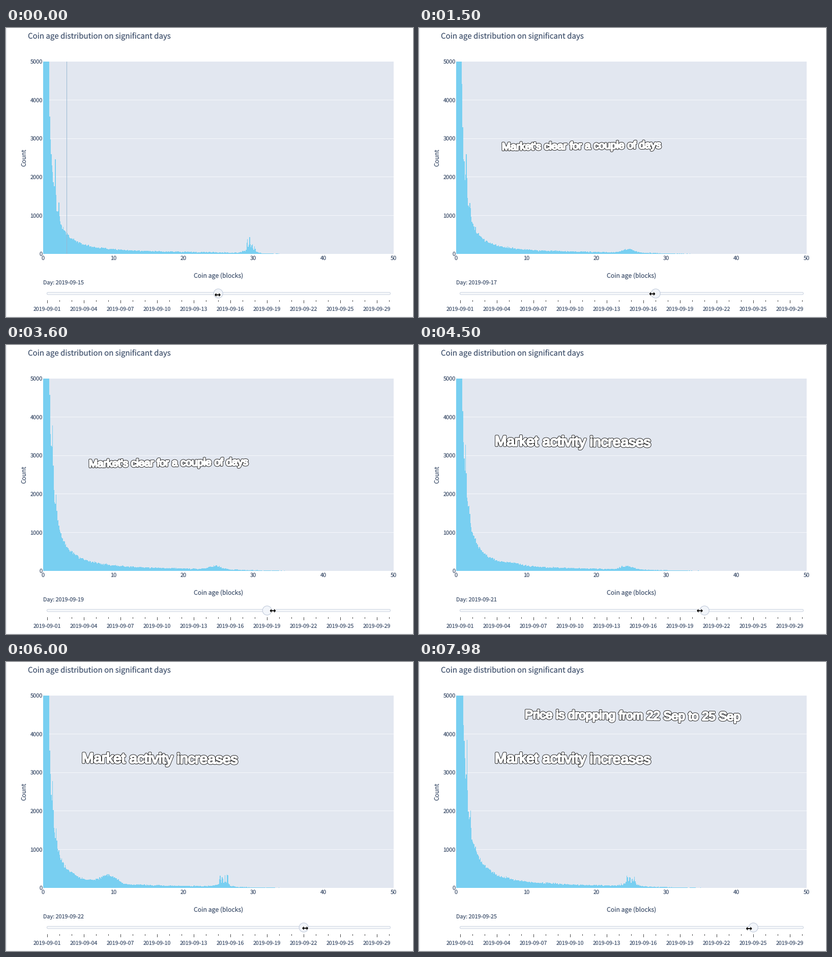
A matplotlib script for the animation above (8000 ms loop, 800 by 568 pixels).

```python
import numpy as np
import matplotlib.pyplot as plt
from matplotlib.animation import FuncAnimation
from matplotlib.collections import PolyCollection
from matplotlib.patches import Circle, FancyBboxPatch, Polygon, Rectangle
from matplotlib.patheffects import Normal, Stroke

W, H, DPI = 800, 568, 100
PT = 72 / DPI  # points per pixel
STEP, LOOP = 40, 8000

LEFT, RIGHT, TOP, BASE = 73, 762, 66, 444.3
UNIT = (RIGHT - LEFT) / 50
PER_COUNT = (BASE - TOP) / 5000
DAY_X0, DAY_DX, RAIL_Y = 81.2, 24, 521.8

INK, PLOT_BG, BAR = "#43546f", "#e2e7f0", "#78cff1"

plt.rcParams["font.family"] = ["Noto Sans CJK JP", "DejaVu Sans"]
plt.rcParams["text.hinting"] = "none"

# ---- histogram model ------------------------------------------------------
AGES = np.arange(500) * 0.1 + 0.05
FIRST_DAY, LAST_DAY = 15, 25
BURST_DAYS = {15, 18, 22, 25}


def bump(center, height, sigma):
    return height * np.exp(-((AGES - center) / sigma) ** 2 / 2)


def histogram(day):
    """Power-law decay, its echoes, a drifting hump and an old cohort."""
    rng = np.random.default_rng(day)
    scale = np.interp(day, [15, 17, 18, 21, 22, 23, 25],
                      [3150, 2850, 4100, 3500, 3000, 2050, 4500])
    n = scale * AGES ** -1.5 * np.minimum(AGES, 1) ** -1.2
    n = n / (1 + (AGES / 31) ** 8) + 25 / (1 + (AGES / 29) ** 12)

    echo = np.interp(day, [15, 18, 23, 25], [1.76, 1.34, 1.37, 1.55])
    n += bump(echo, 0.35 * scale, 0.06) + bump(echo + 0.5, 0.1 * scale, 0.06)

    hump = 280 * np.exp(-((day - 22.7) / 1.2) ** 2)
    n += bump(8.2 + 1.1 * (day - 21), hump, 1.1)

    old = np.interp(day, [15, 17, 21, 23, 25], [29.4, 24.6, 24.4, 26.7, 24.7])
    n += bump(old, 85, 0.8)
    if day in BURST_DAYS:
        for k in range(4):
            n += bump(old - 0.3 + 0.35 * k, rng.uniform(120, 330), 0.08)
    if day == 18:
        n += bump(3.19, 3900, 0.06) + bump(6.8, 130, 1.3)

    rough = 0.03 + 0.004 * AGES
    return np.clip(n * (1 + rough * rng.normal(size=AGES.size)), 0, 5000)


def bar_quads(counts):
    x0 = LEFT + (AGES - 0.05) * UNIT
    x1 = x0 + 0.1 * UNIT
    y = BASE - counts * PER_COUNT
    floor = np.full_like(y, BASE)
    xs = np.stack([x0, x0, x1, x1], axis=1)
    ys = np.stack([floor, y, y, floor], axis=1)
    return np.stack([xs, ys], axis=2)


QUADS = {day: bar_quads(histogram(day))
         for day in range(FIRST_DAY, LAST_DAY + 1)}

# ---- stage ----------------------------------------------------------------
fig = plt.figure(figsize=(W / DPI, H / DPI), dpi=DPI, facecolor="white")
ax = fig.add_axes([0, 0, 1, 1])
ax.set_xlim(0, W)
ax.set_ylim(H, 0)
ax.axis("off")


def rect(x, y, w, h, color, z=1):
    return ax.add_patch(Rectangle((x, y), w, h, fc=color, lw=0, zorder=z))


def label(x, y, s, size, ha="center", **kw):
    return ax.text(x, y, s, fontsize=size * PT, color=INK, ha=ha,
                   va="baseline", **kw)


rect(0, 0, 1.5, H, "#eef0f5")
rect(0, H - 1.5, W, 1.5, "#f1f3f7")
rect(LEFT, TOP, RIGHT - LEFT, BASE - TOP, PLOT_BG)

label(43, 21, "Coin age distribution on significant days", 15.05, "left")
label(417.5, 490.5, "Coin age (blocks)", 12.2)
label(39.5, 255, "Count", 12.2, rotation=90, rotation_mode="anchor")

for n in range(0, 5001, 1000):
    y = BASE - n * PER_COUNT
    label(72, y + 4, str(n), 11, "right")
    if 0 < n < 5000:
        rect(LEFT, int(y), RIGHT - LEFT, 1, "#f5f7fb", 2)
for n in range(0, 51, 10):
    label(LEFT + n * UNIT, 456, str(n), 11)

bars = PolyCollection(QUADS[FIRST_DAY], facecolors=BAR, linewidths=0, zorder=3)
ax.add_collection(bars)
spike = rect(119, TOP, 1, BASE - TOP, "#98b9d2", 4)

# ---- slider ---------------------------------------------------------------
day_text = label(73, 503, "", 10.8, "left")
ax.add_patch(FancyBboxPatch((80.5, 519.5), 675, 4.5,
                            boxstyle="round,pad=0,rounding_size=2",
                            fc="#f6f8fb", ec="#c6cfdd", lw=0.9 * PT,
                            zorder=3))
for k in range(29):
    major = k % 3 == 0
    rect(round(DAY_X0 + k * DAY_DX), 535, 1, 6 if major else 3, "#444444")
for k, d in enumerate([*range(1, 26, 3), 29]):
    label(DAY_X0 + 3 * DAY_DX * k, 555.5, f"2019-09-{d:02d}", 10.6)

handle = Circle((0, RAIL_Y), 9, fc="#f2f5fa", ec="#bec8d9", lw=PT, zorder=5)
ax.add_patch(handle)

HALF = np.array([(-2.6, 3.8), (-6, 0), (-2.6, -3.8), (-2.6, -1), (2.6, -1)])
ARROW = np.vstack([HALF, -HALF])
pointer = Polygon(ARROW, closed=True, fc="black", lw=0, zorder=6)
pointer.set_path_effects([Stroke(linewidth=1.8 * PT, foreground="white"),
                          Normal()])
ax.add_patch(pointer)


# ---- captions -------------------------------------------------------------
def caption(x, y, s, size, angle):
    fx = [Stroke(linewidth=4.2 * PT, foreground="black"),
          Stroke(linewidth=2.6 * PT, foreground="white"), Normal()]
    return ax.text(x, y, s, family="Liberation Sans", fontsize=size * PT,
                   color="white", ha="left", va="baseline", rotation=angle,
                   rotation_mode="anchor", path_effects=fx, zorder=7)


# caption, first day, last day
captions = [
    (caption(163, 240, "Market's clear for a couple of days", 20.6, 0.7),
     17, 19),
    (caption(149, 198, "Market activity increases", 28, -0.4), 20, LAST_DAY),
    (caption(208, 111, "Price is dropping from 22 Sep to 25 Sep", 23.9, -0.55),
     23, LAST_DAY),
]

# ---- motion: a steady drag with one short rest ----------------------------
TIMES = [0, 1500, 2880, 4800, 5100, 6720, 8000]
PATH_X = [416, 459, 502, 562, 562, 609, 650]
PATH_Y = [524.5, 522.5, 522.3, 522.3, 523, 523.4, 524]


def update(i):
    t = i * STEP
    px = np.interp(t, TIMES, PATH_X)
    py = np.interp(t, TIMES, PATH_Y)
    pointer.set_xy(ARROW + (px, py))

    # the handle snaps to whole days
    day = int((px - 81) / DAY_DX + 0.45) + 1
    handle.center = (DAY_X0 + (day - 1) * DAY_DX, RAIL_Y)
    day_text.set_text(f"Day: 2019-09-{day:02d}")
    bars.set_verts(QUADS[day])
    spike.set_visible(day == FIRST_DAY)
    for text, first, last in captions:
        text.set_visible(first <= day <= last)
    return []


anim = FuncAnimation(fig, update, frames=LOOP // STEP, interval=STEP,
                     repeat=True, repeat_delay=0)
plt.show()
```
